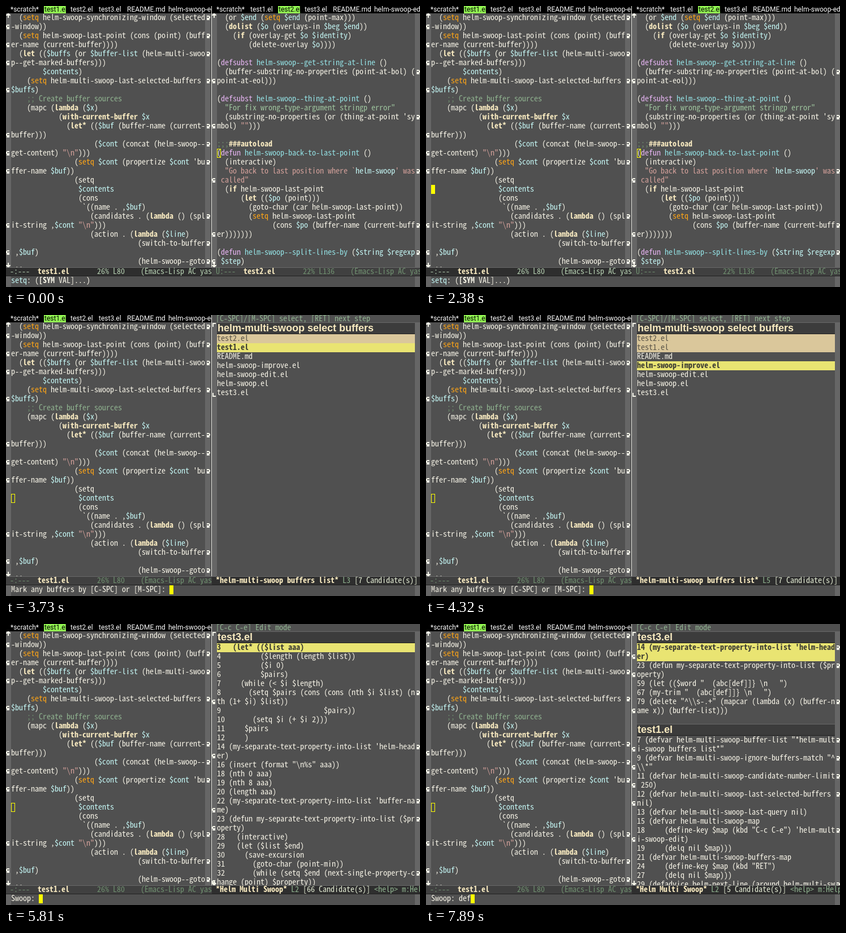
An HTML page with a canvas that plays this animation: 732 by 498 pixels, repeating every 8 s.

```html
<!DOCTYPE html>
<html lang="en">
<head>
<meta charset="utf-8">
<title>Editor buffer search</title>
<style>
html, body { margin: 0; width: 732px; height: 498px; overflow: hidden; background: #505050; }
canvas { display: block; }
</style>
</head>
<body>
<canvas id="stage" width="732" height="498"></canvas>
<script>
const ctx = document.getElementById('stage').getContext('2d');
const LOOP = 8000, COL = 7, ROW = 16, TOP = 13, MODE_Y = 463, ECHO_Y = 479;
const BG = '#505050', FRINGE = '#666', FG = '#f6f3e6', CREAM = '#f8eac0', CYAN = '#c4f6f4',
      GREEN = '#8fb28f', DIM = '#6f8f6f', DARK = '#2e2e2e', YELLOW = '#e9e472', TAN = '#dac79b',
      CURSOR = '#ffff00';

// Font size at which one character fills one column
const FAMILY = '"Noto Sans Mono CJK JP", "Noto Sans Mono", monospace';
ctx.font = '100px ' + FAMILY;
const MONO = `${100 * COL / ctx.measureText('0').width}px ${FAMILY}`;

const LEFT = { x: 0, text: 9, cols: 49, end: 352 };
const RIGHT = { x: 364, text: 373, cols: 50, end: 723 };

// Every moment at which the picture changes
const STEPS = [300, 750, 1190, 1790, 2230, 2380, 2680, 3730, 4020, 4320, 4470,
               4610, 4760, 5660, 5810, 7460, 7600, 7750, 7890];
const MOVES = [3730, 4020, 4320, 4470, 4610, 4760];

const leftCode = String.raw`  (setq helm-swoop-synchronizing-window (selected-window))
  (setq helm-swoop-last-point (cons (point) (buffer-name (current-buffer))))
  (let (($buffs (or $buffer-list (helm-multi-swoop--get-marked-buffers)))
        $contents)
    (setq helm-multi-swoop-last-selected-buffers $buffs)
    ;; Create buffer sources
    (mapc (lambda ($x)
            (with-current-buffer $x
              (let* (($buf (buffer-name (current-buffer)))
                     ($cont (concat (helm-swoop--get-content) "\n")))
                (setq $cont (propertize $cont 'buffer-name $buf))
                (setq
                 $contents
                 (cons
                  ${'`'}((name . ,$buf)
                    (candidates . (lambda () (split-string ,$cont "\n")))
                    (action . (lambda ($line)
                                (switch-to-buffer ,$buf)
                                (helm-swoop--goto-line`.split('\n');

const rightCode = String.raw`  (or $end (setq $end (point-max)))
  (dolist ($o (overlays-in $beg $end))
    (if (overlay-get $o $identity)
        (delete-overlay $o))))

(defsubst helm-swoop--get-string-at-line ()
  (buffer-substring-no-properties (point-at-bol) (point-at-eol)))

(defsubst helm-swoop--thing-at-point ()
  "For fix wrong-type-argument stringp error"
  (substring-no-properties (or (thing-at-point 'symbol) "")))

;;;###autoload
(defun helm-swoop-back-to-last-point ()
  (interactive)
  "Go back to last position where ${'`'}helm-swoop' was called"
  (if helm-swoop-last-point
      (let (($po (point)))
        (goto-char (car helm-swoop-last-point))
        (setq helm-swoop-last-point
              (cons $po (buffer-name (current-buffer)))))))

(defun helm-swoop--split-lines-by ($string $regexp $step)`.split('\n');

const buffers = ['test2.el', 'test1.el', 'README.md', 'helm-swoop-improve.el',
                 'helm-swoop-edit.el', 'helm-swoop.el', 'test3.el'];

const allLines = String.raw`3   (let* (($list aaa)
4          ($length (length $list))
5          ($i 0)
6          $pairs)
7     (while (< $i $length)
8       (setq $pairs (cons (cons (nth $i $list) (nth (1+ $i) $list))
9                          $pairs))
10       (setq $i (+ $i 2)))
11     $pairs
12     )
14 (my-separate-text-property-into-list 'helm-header)
16 (insert (format "\n%s" aaa))
18 (nth 0 aaa)
19 (nth 8 aaa)
20 (length aaa)
22 (my-separate-text-property-into-list 'buffer-name)
23 (defun my-separate-text-property-into-list ($property)
28   (interactive)
29   (let ($list $end)
30     (save-excursion
31       (goto-char (point-min))
32       (while (setq $end (next-single-property-change (point) $property))`.split('\n');

const deLines = String.raw`59 (let (($word "  (abc[def]]} \n   ")
67 (my-trim "  (abc[def]]} \n   ")
79 (delete "^\\s-.+" (mapcar (lambda (x) (buffer-name x)) (buffer-list)))`.split('\n');

const otherLines = String.raw`7 (defvar helm-multi-swoop-buffer-list "*helm-multi-swoop buffers list*"
9 (defvar helm-multi-swoop-ignore-buffers-match "^\\*"
11 (defvar helm-multi-swoop-candidate-number-limit 250)
12 (defvar helm-multi-swoop-last-selected-buffers nil)
13 (defvar helm-multi-swoop-last-query nil)
15 (defvar helm-multi-swoop-map
18     (define-key $map (kbd "C-c C-e") 'helm-multi-swoop-edit)
19     (delq nil $map)))
21 (defvar helm-multi-swoop-buffers-map
24     (define-key $map (kbd "RET")
27     (delq nil $map)))
29 (defadvice helm-next-line (around helm-multi-swoop-next-line`.split('\n');

const withD = allLines.filter(line => /^(14|23|29|32) /.test(line));

// Later rules override earlier ones: pattern, colour, bold
const RULES = [
  [/\$[\w-]+/g, CYAN],
  [/(?<=\()(let\*?|lambda|with-current-buffer|dolist|if)(?= )/g, CREAM, true],
  [/\bsetq(?= )/g, '#ffa516'],
  [/(?<=\()def\w+/g, '#e6b4f2'],
  [/(?<=\(def\w+ )[\w-]+/g, '#93e0e3'],
  [/"(\\.|[^"])*"/g, '#d3a09a'],
  [/"For.*"/g, '#9fc59f'],
  [/(?<=`)[\w-]+(?=')/g, CYAN],
  [/;;.*/g, GREEN],
  [/^\s*;+/g, DIM],
  [/###\w+/g, CREAM, true],
];

const GLYPHS = {
  curl: new Path2D('M2 0H6L8 2V4L6 7H7V8H2V3H3V4H5L6 3V2H2Z'),
  arrow: new Path2D('M3 0H5L8 3V4H5V8H3V4H0V3Z'),
  corner: new Path2D('M1 1H7V3H3V8H1Z'),
};

function box(x, y, w, h, color) {
  ctx.fillStyle = color;
  ctx.fillRect(x, y, w, h);
}

// Raised bar with a light upper and a dark lower edge
function bar(x, y, w, h, color) {
  box(x, y, w, h, color);
  box(x, y, w, 1, '#686868');
  box(x, y + h - 1, w, 1, '#202020');
}

function glyph(name, x, y, sx = 1, sy = 1) {
  ctx.save();
  ctx.translate(x + (sx < 0 ? 8 : 0), y + (sy < 0 ? 8 : 0));
  ctx.scale(sx, sy);
  ctx.fillStyle = '#f4f4e8';
  ctx.fill(GLYPHS[name]);
  ctx.restore();
}

function put(char, x, y, color, bold) {
  ctx.font = (bold ? 'bold ' : '') + MONO;
  ctx.fillStyle = color;
  ctx.fillText(char, x, y);
}

// Draws [text, colour, bold] runs on the character grid
function runs(x, y, list) {
  for (const [str, color, bold] of list)
    for (const char of str) {
      put(char, x, y, color, bold);
      x += COL;
    }
}

function highlight(line) {
  const styles = Array(line.length).fill([FG]);
  for (const [pattern, ...style] of RULES)
    for (const m of line.matchAll(pattern))
      styles.fill(style, m.index, m.index + m[0].length);
  return styles;
}

// Draws one wrapped line and returns the y of the next row
function wrapped(pane, y, line, styles, back) {
  const count = Math.max(1, Math.ceil(line.length / pane.cols));
  for (let r = 0; r < count && y < MODE_Y; r++, y += ROW) {
    if (back) box(pane.text, y, pane.end - pane.text, ROW, back);
    for (let c = 0; c < pane.cols; c++) {
      const i = r * pane.cols + c;
      if (i < line.length) put(line[i], pane.text + c * COL, y + 12, ...styles[i]);
    }
    if (r) glyph('curl', pane.x, y + 4, -1);
    if (r < count - 1) glyph('curl', pane.end + 1, y + 4);
  }
  return y;
}

function code(pane, lines) {
  let y = TOP;
  for (const line of lines) y = wrapped(pane, y, line, highlight(line));
  glyph('arrow', pane.x, TOP);
  glyph('arrow', pane.x, MODE_Y - 8, 1, -1);
}

function item(y, line, back) {
  const style = back === YELLOW ? ['#3a3a32', true] : [back ? '#5a5448' : FG];
  return wrapped(RIGHT, y, line, Array(line.length).fill(style), back);
}

function title(y, str) {
  bar(RIGHT.text, y, RIGHT.end - RIGHT.text, 21, '#3c3c3c');
  ctx.font = 'bold 18px "Liberation Sans", Arial, sans-serif';
  ctx.fillStyle = CREAM;
  ctx.fillText(str, RIGHT.text + 1, y + 16);
  return y + 21;
}

function header(str) {
  box(RIGHT.x, 0, 368, TOP, BG);
  runs(371, 11, [[str, GREEN]]);
}

function tabs(pane, active) {
  const names = ['*scratch*', 'test1.el', 'test2.el', 'test3.el', 'README.md', 'helm-swoop-edit.el'];
  const widths = [60, 50, 50, 50, 73, 99];
  ctx.save();
  ctx.beginPath();
  ctx.rect(pane.x, 0, pane === LEFT ? 363 : 368, TOP);
  ctx.clip();
  box(pane.x, 0, 368, TOP, '#000');
  ctx.font = '12px Roboto, sans-serif';
  let x = pane.x + 8;
  names.forEach((name, i) => {
    if (i === active) box(x - 1, 0, 39, TOP, '#92f652');
    ctx.fillStyle = i === active ? '#000' : '#fff';
    ctx.fillText(name, x, 10);
    x += widths[i] - (i === active ? 4 : 0);
  });
  ctx.restore();
}

function fileMode(x, state, name, place, active) {
  bar(x, MODE_Y, 368, ROW, active ? DARK : '#404040');
  const color = active ? '#b4ceb0' : DIM;
  runs(x + 7, 475, [[state + '  ', color], [name, CREAM, true],
    ['       ' + place + '    (Emacs-Lisp AC yas', color]]);
}

function listMode(name, line, count, help) {
  bar(RIGHT.x, MODE_Y, 368, ROW, DARK);
  runs(371, 475, [[name, CREAM, true], [` L${line} `, GREEN],
    [`[${count} Candidate(s)]`, '#e4ecd4'], [help, GREEN]]);
}

function hollow(x, y) {
  ctx.strokeStyle = CURSOR;
  ctx.lineWidth = 1;
  ctx.strokeRect(x + .5, y + .5, 6, 15);
}

function bufferList(t) {
  const sel = MOVES.filter(m => t >= m).length;
  header('[C-SPC]/[M-SPC] select, [RET] next step');
  let y = title(TOP, 'helm-multi-swoop select buffers');
  buffers.forEach((name, i) => {
    y = item(y, name, i === sel ? YELLOW : i < Math.min(sel, 2) ? TAN : null);
  });
  glyph('corner', RIGHT.x, TOP);
  glyph('corner', RIGHT.x, y - 8, 1, -1);
  listMode('*helm-multi-swoop buffers list*', sel + 2, 7, '');
}

function swoopList(t) {
  const filtered = t >= 7600, narrow = t >= 7750;
  const lines = !filtered ? allLines : [...withD.slice(0, narrow ? 2 : 4), ...deLines];
  header('[C-c C-e] Edit mode');
  let y = title(TOP, 'test3.el');
  lines.forEach((line, i) => { y = item(y, line, i ? null : YELLOW); });
  if (filtered) {
    y = title(y + 15, 'test1.el');
    for (const line of otherLines) y = item(y, line);
  }
  glyph('corner', RIGHT.x, TOP);
  glyph('arrow', RIGHT.x, MODE_Y - 8, 1, -1);
  listMode('*Helm Multi Swoop*', 2, narrow ? 5 : filtered ? 44 : 66, ' <help> m:Help');
}

function prompt(str) {
  runs(9, ECHO_Y + 12, [[str, FG]]);
  box(9 + str.length * COL, ECHO_Y, COL, ROW, CURSOR);
}

function echo(t) {
  box(0, ECHO_Y, 732, 19, BG);
  box(0, ECHO_Y, 9, 19, FRINGE);
  box(723, ECHO_Y, 9, 19, FRINGE);
  if (t >= 5810) prompt('Swoop: ' + 'def'.slice(0, [7460, 7600, 7890].filter(m => t >= m).length));
  else if (t >= 2680 && t < 5660) prompt('Mark any buffers by [C-SPC] or [M-SPC]: ');
  else if (t < 2230 || t >= 2380 && t < 2680)
    runs(9, ECHO_Y + 12, [['setq', CYAN], [': (', FG], ['[SYM', FG, true], [' VAL]...)', FG]]);
}

function draw(t) {
  const editing = t < 2680;
  box(0, 0, 732, 498, BG);
  for (const pane of [LEFT, RIGHT]) {
    box(pane.x, TOP, 9, MODE_Y - TOP, FRINGE);
    box(pane.end, TOP, 9, MODE_Y - TOP, FRINGE);
  }
  tabs(LEFT, 1);
  code(LEFT, leftCode);
  if (!editing) hollow(9, 317);
  else if (t >= 300 && t < 750 || t >= 1190 && t < 1790 || t >= 2230) box(9, 317, COL, ROW, CURSOR);
  fileMode(0, '-:---', 'test1.el', '26% L80', editing);

  if (editing) {
    tabs(RIGHT, 2);
    code(RIGHT, rightCode);
    hollow(RIGHT.text, 253);
    fileMode(364, 'U:---', 'test2.el', '22% L136', false);
  } else if (t < 5810) bufferList(t);
  else swoopList(t);

  box(363, 0, 1, MODE_Y, '#e4e4dc');
  echo(t);
}

let shown = -1;
function tick() {
  const t = performance.now() % LOOP;
  const step = STEPS.filter(m => t >= m).length;
  if (step !== shown) draw(t);
  shown = step;
  requestAnimationFrame(tick);
}
tick();
</script>
</body>
</html>
```
